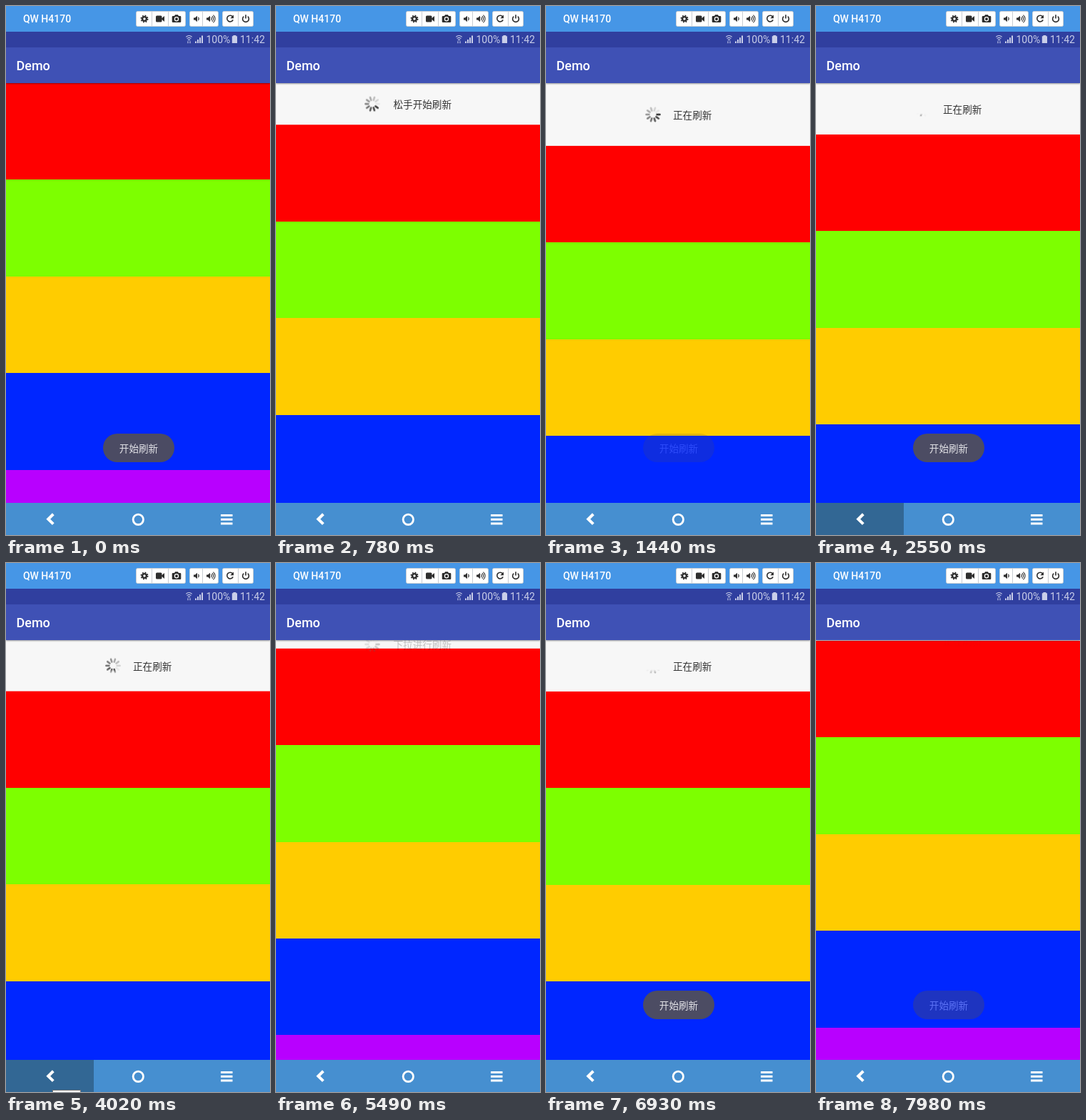
Write an HTML page that moves like this. It is 370x741 px and loops after 8000 ms.

```html
<!DOCTYPE html>
<html lang="zh-CN">
<head>
<meta charset="utf-8">
<title>Pull to refresh</title>
<style>
@property --pull { syntax: "<number>"; inherits: true; initial-value: 0; }
html, body { margin: 0; width: 100%; height: 100%; overflow: hidden; }
body { position: relative; font-family: Roboto, sans-serif; background: #f7f7f7; }
div, span, svg { position: absolute; }
.chrome { left: 0; top: 0; }

.list { left: 0; top: 108px; width: 370px; height: 588px; overflow: hidden; animation: pull 8s linear infinite; }
.stripes {
  width: 370px; height: 678px; transform: translateY(calc(var(--pull) * 1px));
  background: linear-gradient(#f00 135.4px, #7dff00 0 270.8px, #fc0 0 406.2px, #0026ff 0 541.6px, #b800ff 0);
}
.head { width: 370px; height: 0; transform: translateY(calc(var(--pull) * .5px)); opacity: calc(var(--pull) / 45); }
.bar { left: 0; top: 58px; width: 370px; height: 50px; background: #3f51b5; box-shadow: 0 1px 2px rgba(0, 0, 0, .4); }

.label, .toast { font: 13.6px/20px "Noto Sans CJK SC", "Noto Sans CJK JP", sans-serif; white-space: nowrap; }
.label { top: -10px; left: 164.5px; color: #333; animation: 8s step-end infinite; }
.hint { animation-name: hint; }
.ready { animation-name: ready; }
.busy { left: 178px; animation-name: busy; }

.spin {
  top: -11px; left: 124px; width: 22px; height: 22px;
  mask: linear-gradient(transparent 25px, #000 33px 57px, transparent 65px) 0 -34px / 100% 90px no-repeat;
  animation: place 8s step-end infinite, wipe 8s linear infinite;
}
.spin svg { left: 0; top: 0; animation: turn .8s steps(10) infinite; }

.toast {
  left: 136px; top: 598.5px; width: 100px; height: 40px; border-radius: 20px; line-height: 41px;
  text-align: center; color: #e4e4e8; background: rgba(82, 80, 88, .93); animation: toast 8s linear infinite;
}
.nav { left: 0; top: 696px; width: 370px; height: 45px; background: #468fd0; }
.hover { width: 123px; height: 45px; background: #326794; animation: hover 8s step-end infinite; }
.tip { left: 65px; top: 42px; width: 38px; height: 6px; background: #fff; border: 1px solid #767676; animation: tip 8s step-end infinite; }
.nav svg { left: 0; top: 0; }

@keyframes pull {
  0%, 8.625% { --pull: 0; }
  9% { --pull: 11; }
  9.75% { --pull: 58; }
  11.25% { --pull: 95; }
  16.875% { --pull: 112; }
  17.625% { --pull: 100; }
  18% { --pull: 88; }
  19.5% { --pull: 77; }
  21.25% { --pull: 72; }
  50.25% { --pull: 72; animation-timing-function: cubic-bezier(.2, .6, .3, 1); }
  57%, 68.25% { --pull: 0; }
  68.625% { --pull: 11; }
  69.375% { --pull: 58; }
  70.875% { --pull: 95; }
  76.5% { --pull: 112; }
  77.25% { --pull: 100; }
  77.625% { --pull: 88; }
  79.125% { --pull: 77; }
  80.875%, 87.37% { --pull: 72; }
  87.375% { --pull: 31; }
  94.8% { --pull: 31; animation-timing-function: cubic-bezier(.2, .6, .4, 1); }
  99.75%, 100% { --pull: 1; }
}
@keyframes hint { 0%, 62.5% { opacity: 1; } 9.5%, 69.125%, 100% { opacity: 0; } }
@keyframes ready { 0%, 17.4%, 77.05%, 100% { opacity: 0; } 9.5%, 69.125% { opacity: 1; } }
@keyframes busy { 0%, 62.5% { opacity: 0; } 17.4%, 77.05%, 100% { opacity: 1; } }
@keyframes place { 0%, 62.5% { left: 124px; } 17.4%, 77.05%, 100% { left: 138.5px; } }
@keyframes wipe {
  0%, 25.5% { mask-position: 0 -34px; }
  33.75%, 40% { mask-position: 0 0; }
  40.01% { mask-position: 0 -68px; }
  53.4%, 80% { mask-position: 0 -34px; }
  86.625% { mask-position: 0 -9px; }
  87.375%, 100% { mask-position: 0 0; }
}
@keyframes turn { to { transform: rotate(360deg); } }
@keyframes toast {
  0% { opacity: 1; }
  4.3%, 17.25% { opacity: 0; }
  21.1%, 45% { opacity: 1; }
  49.1%, 76.9% { opacity: 0; }
  80.75%, 97.125% { opacity: 1; }
  100% { opacity: .35; }
}
@keyframes hover { 0%, 59.625%, 100% { opacity: 0; } 27.5% { opacity: 1; } }
@keyframes tip { 0%, 52.5%, 100% { opacity: 0; } 41.25% { opacity: 1; } }
</style>
</head>
<body>
<div class="list">
  <div class="stripes"></div>
  <div class="head">
    <div class="spin"><svg id="spokes" width="22" height="22" viewBox="-11 -11 22 22"></svg></div>
    <span class="label hint">下拉进行刷新</span>
    <span class="label ready">松手开始刷新</span>
    <span class="label busy">正在刷新</span>
  </div>
</div>
<div class="bar"></div>

<svg class="chrome" width="370" height="108">
  <path d="M0 0H370V36H0z" fill="#4696e6"/>
  <path d="M0 36H370V58H0z" fill="#303f9f"/>
  <text x="24" y="23" font-size="14" font-weight="500" fill="#fff">QW H4170</text>
  <text x="14.5" y="90" font-size="18" font-weight="500" fill="#fff">Demo</text>

  <g fill="#fff" stroke="#c8cdd3">
    <rect x="182.5" y="7.5" width="69" height="21" rx="2"/>
    <rect x="257.5" y="7.5" width="40" height="21" rx="2"/>
    <rect x="303.5" y="7.5" width="43" height="21" rx="2"/>
    <path d="M204.5 8V28M227.5 8V28M275.5 8V28M325.5 8V28"/>
  </g>
  <g fill="none" stroke="#2d2d2d" stroke-width="1.6">
    <circle cx="194" cy="18" r="2.9" stroke-width="2.4"/>
    <circle cx="194" cy="18" r="4.7" stroke-dasharray="1.85 1.84"/>
    <path d="M317.6 14.8A4.4 4.4 0 1 0 318.2 19.4"/>
    <path d="M333.2 14.6A4.4 4.4 0 1 0 338.8 14.6M336 12.3V17.6"/>
    <path d="M269.3 16A2.6 2.6 0 0 1 269.3 20" stroke-width="1.2"/>
    <path d="M287.3 16A2.6 2.6 0 0 1 287.3 20M288.8 14.2A4.8 4.8 0 0 1 288.8 21.8M290.4 12.6A6.8 6.8 0 0 1 290.4 23.4" stroke-width="1.1"/>
  </g>
  <g fill="#2d2d2d">
    <rect x="210" y="13.5" width="8.5" height="9" rx="1.5"/>
    <path d="M218 17.5L222 14V22L218 18.5z"/>
    <path d="M319 12.5V17.2H314.3z"/>
    <path d="M263 16.5H265L268 13.8V22.2L265 19.5H263zM281 16.5H283L286 13.8V22.2L283 19.5H281z"/>
    <path d="M234 14H236L237 12.3H241L242 14H244Q245.3 14 245.3 15.3V21.7Q245.3 23 244 23H234Q232.7 23 232.7 21.7V15.3Q232.7 14 234 14z"/>
    <circle cx="239" cy="18.3" r="2.6" fill="none" stroke="#fff" stroke-width="1.2"/>
  </g>

  <g fill="#c9cee9" font-size="14">
    <text x="280.5" y="52">100%</text>
    <text x="328" y="52">11:42</text>
    <path d="M318.4 41H322.4V42.3H324V52H316.8V42.3H318.4z"/>
    <path d="M265 49.5h2V52h-2zM268 47h2v5h-2zM271 44.3h2V52h-2zM274 41.5h2V52h-2z"/>
    <g fill="none" stroke="#c9cee9" stroke-width="1.1">
      <path d="M252.3 43.4Q256.5 39.6 260.7 43.4M253.6 45.7Q256.5 43 259.4 45.7M255 47.8Q256.5 46.5 258 47.8"/>
      <path d="M255 49.2V52.2M258 49.2V52.2"/>
    </g>
  </g>
</svg>

<div class="toast">开始刷新</div>

<div class="nav">
  <div class="hover"></div>
  <div class="tip"></div>
  <svg width="370" height="45" fill="none" stroke="#fff">
    <path d="M66.3 15.8L59.2 22.7L66.3 29.6" stroke-width="4"/>
    <circle cx="185.3" cy="23.3" r="7.2" stroke-width="2.8"/>
    <path d="M301 17.5H317.5M301 23.3H317.5M301 29H317.5" stroke-width="3"/>
  </svg>
</div>

<script>
const count = 10, head = -198;
const spokes = document.getElementById('spokes');
for (let i = 0; i < count; i++) {
  const line = document.createElementNS('http://www.w3.org/2000/svg', 'path');
  const tone = Math.round(50 + 180 * i / (count - 1));
  line.setAttribute('d', 'M0 -5.6V-9.6');
  line.setAttribute('stroke', `rgb(${tone},${tone},${tone})`);
  line.setAttribute('stroke-width', 2.6);
  line.setAttribute('stroke-linecap', 'round');
  line.setAttribute('transform', `rotate(${head + i * 360 / count})`);
  spokes.append(line);
}
</script>
</body>
</html>
```
